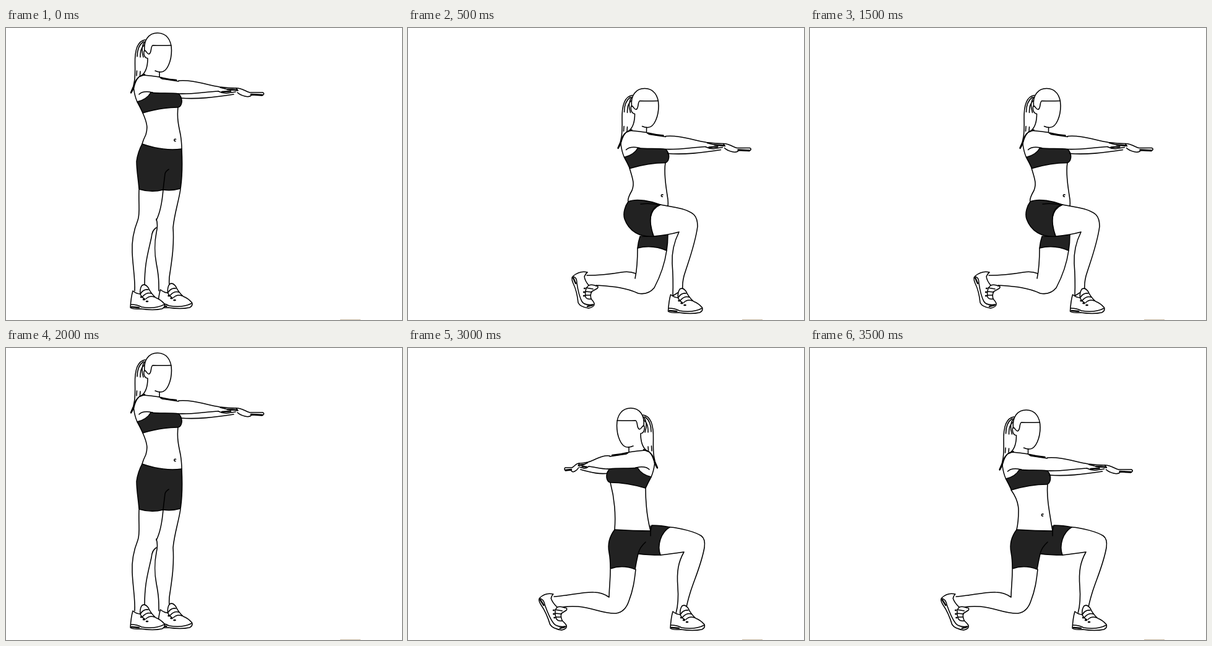
An HTML page for the animation above (4000 ms loop, 640 by 471 pixels).

```html
<!DOCTYPE html>
<html lang="en">
<head>
<meta charset="utf-8">
<title>Lunge with twist</title>
<style>
html, body { margin: 0; width: 100%; height: 100%; overflow: hidden; background: #fff; }
svg { display: block; width: 640px; height: 471px; }
path { fill: none; stroke: #000; stroke-width: 1.55; stroke-linecap: round; stroke-linejoin: round; vector-effect: non-scaling-stroke; }
.dark { fill: #222; }
.white { fill: #fff; }
.bold { stroke-width: 2.4; }
.pose { visibility: hidden; }
</style>
</head>
<body>
<svg viewBox="0 0 640 471">
<defs>
  <g id="head">
    <path d="M225 19C212 21 208 38 208.500 58C209 80 208 92 202 105C208 98 207 87 214 80"/>
    <path d="M222 22C215 27 212 36 212 46M224 27C218 32 217 38 217 47M224 22C219 29 219 38 222 47M211.500 69L211 77M217 70L216.500 76"/>
    <path class="bold" d="M216 78L224 75M202 104L206 95"/>
    <path class="white" d="M224 37C222 19 231 8 245 8C259 8 267.500 19 267.500 36C267.500 52 261 71 250 71Q245 71 241 69"/>
    <path d="M267 28Q250 28.500 237 28C233 31 236 40 231 42C228 42 227 37 224 36C222 38 222 48 229 49C229 60 227 70 220 76M248 71L248 79"/>
  </g>
  <g id="chest">
    <path d="M221 76C211 79 207 88 206.500 98Q208 110 212 119M215 107Q220 102 231 103L237 104"/>
    <path class="dark" d="M212 119Q228 115 234 104C248 106 265 104 279 106Q285 112 284 120Q283 127 278 128C258 128 238 132 221 137Q217 128 212 119Z"/>
    <path d="M222 76Q235 77 248 79L252 82L279 86"/>
    <path class="bold" d="M250 80Q262 83 275 84"/>
  </g>
  <g id="arms">
    <path d="M279 85C300 83 322 91 345 95Q360 97 372 97M279 106C300 107 322 103 343 102"/>
    <path d="M282 113C310 115 335 112 368 107"/>
    <path d="M343 102Q351 106 358 105L371 103M346 96L358 99L375 101L372 97"/>
    <path class="bold" d="M349 103L363 102M358 99L373 100"/>
    <path d="M373 97C381 97 387 102 394 104L415 104Q419 106 414 109L397 108Q394 112 386 110Q378 108 374 104"/>
    <path class="bold" d="M396 107L414 108"/>
  </g>
  <g id="bust"><use href="#chest"/><use href="#arms"/></g>
  <path id="navel" d="M274.500 179.500A1.700 1.700 0 1 0 274 182.500"/>
  <g id="shoe">
    <path class="white" d="M205 424Q202 434 201 451Q204 454 218 453Q238 456 252 453Q258 450 256 445Q250 438 242 435Q234 428 230 419Q225 412 220 415Q216 420 217 429Q211 429 205 424Z"/>
    <path d="M202 446Q212 446 219 450Q240 454 256 446M217 429Q218 433 224 437"/>
    <path d="M218 428Q222 421 230 422M221 433Q227 426 235 428M226 437Q232 431 240 434"/>
    <path class="bold" d="M203 450L215 451M218 434L220 434M222 438L224 438M227 441L229 441"/>
  </g>
  <g id="backShoe">
    <path class="white" d="M290 394Q278 391 267 400Q263 403 267 412Q273 424 275 443Q278 450 292 452Q302 450 301 444Q299 440 296 437Q294 430 297 425L306 420Q309 416 304 416Q298 413 292 415Q286 408 285 401Q287 396 290 394Z"/>
    <path d="M267 401Q273 402 273 412Q276 432 281 441Q285 448 300 446"/>
    <path d="M292 415Q285 421 287 434Q289 438 296 437M288 419L299 421M287 425L297 426M287 431L295 431"/>
    <path class="bold" d="M267 403L271 412M285 420L286 420M284 426L285 426M284 432L285 432M290 449L298 447"/>
  </g>
  <g id="nearLunge">
    <path d="M371 355C371 375 370 390 367 404M418 359C415 380 408 400 398 419Q388 431 372 428C350 418 330 417 304 415M368 396Q358 392 345 394C322 398 305 399 289 399"/>
    <path class="dark" d="M375 336Q372 345 371 355Q395 349 418 359Q420 347 420 333L397 336Z"/>
    <path class="white" d="M408 285C430 289 450 291 462 301Q468 307 468 320C464 350 452 380 446 400Q443 412 444 422L428 432Q429 405 427 380C426 360 430 345 438 329Q420 334 397 336C388 315 389 293 408 285"/>
    <path class="dark" d="M356 280C370 274 395 280 408 285C390 290 388 310 397 336C375 338 357 328 350 308C347 298 351 287 356 280Z"/>
    <path d="M376 284Q390 282 404 285"/>
    <use href="#shoe" x="219.500" y="6"/>
    <use href="#backShoe"/>
  </g>
  <g id="farLunge">
    <path d="M327 357C327 375 325 390 325 402Q314 394 300 394C282 393 258 400 236 401M368 357C366 375 364 390 357 408Q351 426 336 428C315 429 300 419 275 417Q260 416 250 418"/>
    <path d="M423 289C440 290 465 297 474 303Q481 308 479 322C474 350 462 375 456 395Q452 408 450 418M408 334Q425 332 446 329C437 345 434 360 436 385Q438 410 433 428"/>
    <path class="dark" d="M334 293Q365 295 392 295L394 286Q410 286 423 289C409 297 402 318 408 334Q388 334 372 332Q369 345 367 357Q347 349 327 356Q327 340 325 330Q321 310 334 293Z"/>
    <path d="M372 332Q374 322 384 313M392 287L392 303"/>
    <use href="#shoe" x="223" y="1"/>
    <use href="#backShoe" transform="matrix(1 0 .2 1 -134 3)"/>
  </g>
</defs>

<g class="pose" id="stand">
  <use href="#head"/><use href="#bust"/><use href="#navel"/>
  <path d="M221 137C229 155 229 162 226 172Q222 180 220 187M278 128C276 145 279 158 282 172Q284 185 284 195"/>
  <path d="M215 261C214 285 217 300 213 310C205 330 203 345 204 362C205 385 209 405 208 424M254 261C252 285 248 300 243 310M243 322Q236 326 235 338C229 365 224 380 224 415"/>
  <path d="M243 308Q246 318 243 330C240 345 240 365 243 380C247 400 247 410 247 424M282 260C279 280 272 300 270 322C272 350 268 375 265 395Q263 405 264 416"/>
  <path class="dark" d="M220 187C240 194 260 198 284 195C285 215 285 240 282 259Q268 263 254 261Q235 266 215 260C214 245 211 230 211 215Q213 200 220 187Z"/>
  <path d="M254 260L257 235Q258 231 263 228"/>
  <use href="#shoe" x="44.500" y="-2"/><use href="#shoe"/>
</g>

<g class="pose" id="near">
  <use href="#nearLunge"/>
  <g transform="translate(137.500 89.500)"><use href="#head"/><use href="#bust"/><use href="#navel"/></g>
  <path d="M358 226C364 245 366 252 362 262Q354 276 356 280M416 217C413 235 417 255 419 270Q421 280 420 287"/>
</g>

<g class="pose" id="nearTwist">
  <use href="#nearLunge"/>
  <use href="#head" transform="matrix(-1 0 0 1 635 89.500)"/>
  <use href="#bust" transform="matrix(-1.19 0 0 1 685.500 89.500)"/>
  <use href="#navel" x="108" y="89"/>
  <path d="M355 217Q364 250 356 280M422 226Q415 250 420 287"/>
</g>

<g class="pose" id="far">
  <use href="#farLunge"/>
  <g transform="translate(104.500 92)"><use href="#head"/><use href="#bust"/></g>
  <use href="#navel" x="102.500" y="88.500"/>
  <path d="M325 229C333 240 337 250 337 262Q337 280 334 293M384 220C382 240 387 265 392 295"/>
</g>

<g class="pose" id="farTwist">
  <use href="#farLunge"/>
  <use href="#arms" transform="matrix(-.53 0 0 1 473.900 89)"/>
  <g transform="matrix(-1 0 0 1 605 89)"><use href="#head"/><use href="#chest"/></g>
  <path d="M327 217Q337 255 334 293M384 226Q384 265 392 295"/>
</g>

<rect x="540" y="470" width="33" height="1" fill="#cbbba4"/>
</svg>
<script>
const STEP = 500;
const order = ["stand", "near", "nearTwist", "near", "stand", "far", "farTwist", "far"];
const poses = document.querySelectorAll(".pose");

function draw(now) {
  const current = order[Math.floor(now / STEP) % order.length];
  for (const pose of poses) pose.style.visibility = pose.id === current ? "visible" : "hidden";
  requestAnimationFrame(draw);
}
draw(performance.now());
</script>
</body>
</html>
```
